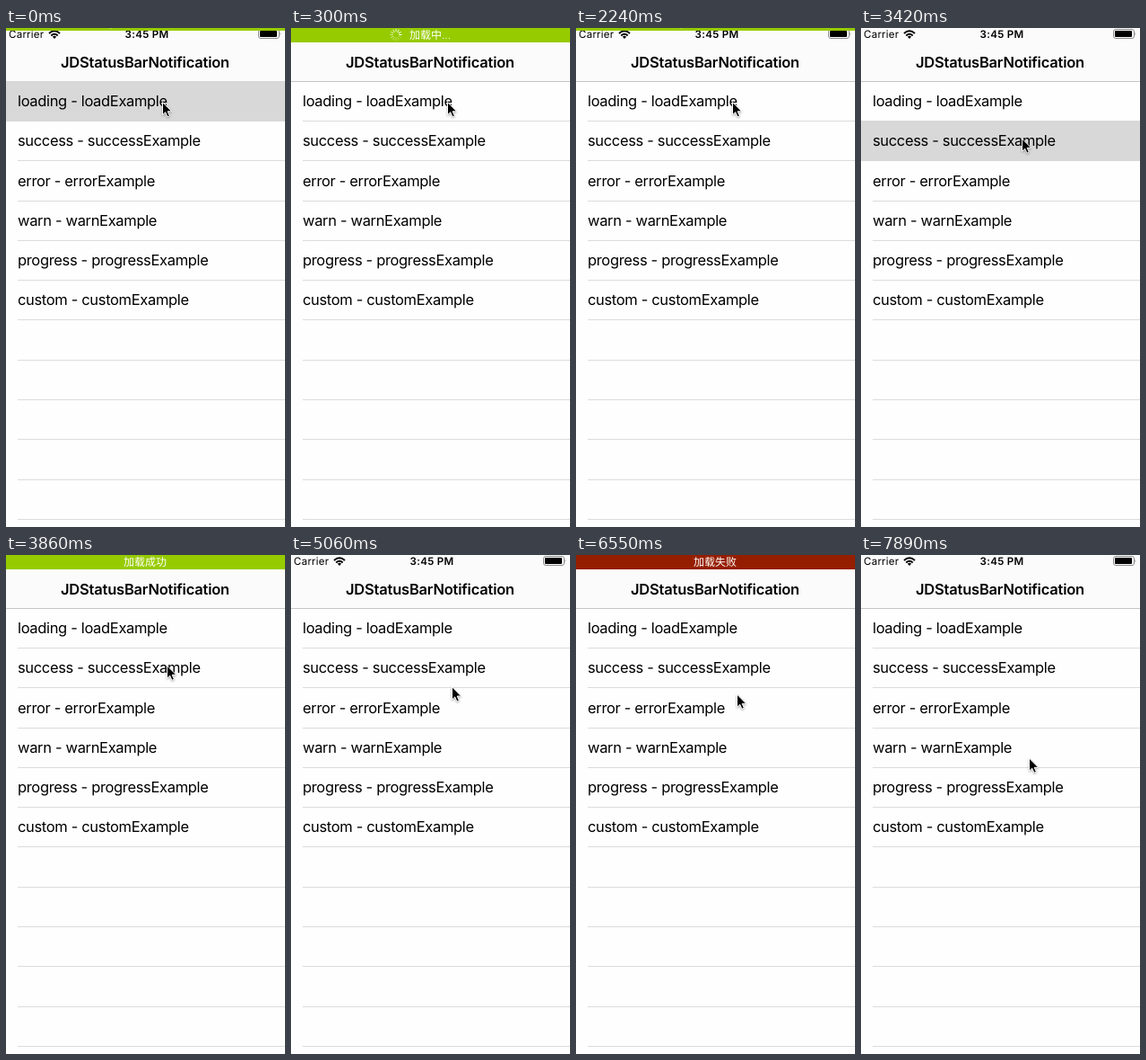
These frames come from a looping animation (311x555 px, 8000 ms). An HTML page:

```html
<!DOCTYPE html>
<html lang="zh-CN">
<head>
<meta charset="utf-8">
<style>
  html, body { margin: 0; height: 100%; overflow: hidden; background: #fefefe; }
  svg { display: block; text-rendering: geometricPrecision; }
  text { font-family: Inter, "Noto Sans CJK SC", "Noto Sans CJK", sans-serif; }
  .list { font-size: 16.5px; letter-spacing: -.34px; }
  .title { font-size: 16.5px; letter-spacing: -.21px; }
  .status { font-size: 11.6px; letter-spacing: .2px; }
  .bold { font-weight: 600; }
  .mid { text-anchor: middle; }
  .note { font-size: 12px; font-weight: 300; fill: #fff; }
</style>
</head>
<body>
<svg width="311" height="555" viewBox="0 0 311 555">
  <rect width="311" height="59" fill="#fbfbfb"/>
  <rect y="59" width="311" height="1" fill="#c6c6c6"/>
  <g id="lines" fill="#dcdcdc"></g>
  <rect id="highlight" width="311" height="45" fill="#d8d8d8"/>
  <g id="labels" class="list"></g>
  <text class="title bold mid" x="155" y="44">JDStatusBarNotification</text>

  <text class="status" x="3" y="11">Carrier</text>
  <g fill="none" stroke="#000" stroke-width="2">
    <path d="M48 5.9Q54 .5 60 5.9M50.3 8.4Q54 5 57.7 8.4"/>
    <path d="M51.9 9.7Q54 7.8 56.1 9.7L54 12Z" fill="#000" stroke="none"/>
  </g>
  <text class="status bold mid" x="157" y="11" style="letter-spacing:.3px">3:45 PM</text>
  <rect x="281.5" y="1.5" width="23" height="10" rx="2.5" fill="none" stroke="#8c8c8c"/>
  <rect x="283" y="3" width="19" height="7" rx="1"/>
  <path d="M305.5 4.7q1.8 1.8 0 3.6z" fill="#8c8c8c"/>

  <g id="bar">
    <rect id="barFill" y="-4" width="311" height="20"/>
    <g id="spinner" stroke="#fff" stroke-width="1" stroke-linecap="round"></g>
    <text id="message" class="note mid" x="155" y="11.6"></text>
  </g>

  <path id="cursor" d="M0 0V14.2L3.2 11.2L5.5 16.3L7.9 15.2L5.7 10.3H10.2Z"
        fill="#000" stroke="#fff" stroke-width="1" style="filter:drop-shadow(0 1px 1px #0005)"/>
</svg>
<script>
const $ = id => document.getElementById(id);
const LOOP = 8000, TICK = 148.3, ROW = 44.28;
const rowTop = i => Math.floor(59.3 + ROW * i);

const notices = [
  { start: -1, end: 15, row: 0, text: "加载中...", color: "#96cb00", busy: true },
  { start: 23, end: 30, row: 1, text: "加载成功", color: "#96cb00" },
  { start: 41, end: 49, row: 2, text: "加载失败", color: "#961e00" }
];
const moves = [
  { start: 16, end: 20, from: [174.5, 82.5], to: [179.5, 123] },
  { start: 32, end: 35, from: [179.5, 123], to: [179.5, 155] },
  { start: 49, end: 53, from: [179.5, 155], to: [187.5, 226] }
];
const dropIn = [0, 3, 13, 16], fadeOut = [1, 1, .5, 0];

const names = ["loading - load", "success - success", "error - error",
  "warn - warn", "progress - progress", "custom - custom"];
$("labels").innerHTML = names.map((name, i) =>
  `<text x="13" y="${Math.round(87 + ROW * i)}">${name}Example</text>`).join("");
for (let i = 1; i < 12; i++)
  $("lines").innerHTML += `<rect x="13" y="${rowTop(i)}" width="298" height="1"/>`;
for (let i = 0; i < 12; i++)
  $("spinner").innerHTML += `<path d="M0-3.6V-6.2" transform="translate(117 7.5) rotate(${i * 30})"/>`;
const spokes = [...$("spinner").children];

function drawNotice(tick) {
  const n = notices.findLast(n => tick >= n.start);
  const age = Math.min(tick - n.start, 3);
  const height = tick > n.end ? 0 : tick === n.end ? 3 : dropIn[age];
  $("bar").setAttribute("transform", `translate(0 ${height - 16})`);
  $("bar").style.display = height ? "" : "none";
  $("barFill").setAttribute("fill", n.color);
  $("message").textContent = n.text;
  $("spinner").style.display = n.busy ? "" : "none";
  $("highlight").setAttribute("y", rowTop(n.row));
  $("highlight").style.opacity = fadeOut[age];
  const head = Math.floor(tick * TICK * 12 / 1000);
  spokes.forEach((s, i) => s.style.opacity = 1 - .07 * ((head - i + 24) % 12));
}

function drawCursor(tick) {
  const m = moves.findLast(m => tick >= m.start) || moves[0];
  const p = Math.max(0, Math.min(1, (tick - m.start) / (m.end - m.start)));
  const e = p * p * (3 - 2 * p);
  const [x, y] = m.from.map((v, i) => v + (m.to[i] - v) * e);
  $("cursor").setAttribute("transform", `translate(${x} ${y})`);
}

function frame() {
  const tick = Math.floor(performance.now() % LOOP / TICK);
  drawNotice(tick);
  drawCursor(tick);
  requestAnimationFrame(frame);
}
frame();
</script>
</body>
</html>
```
